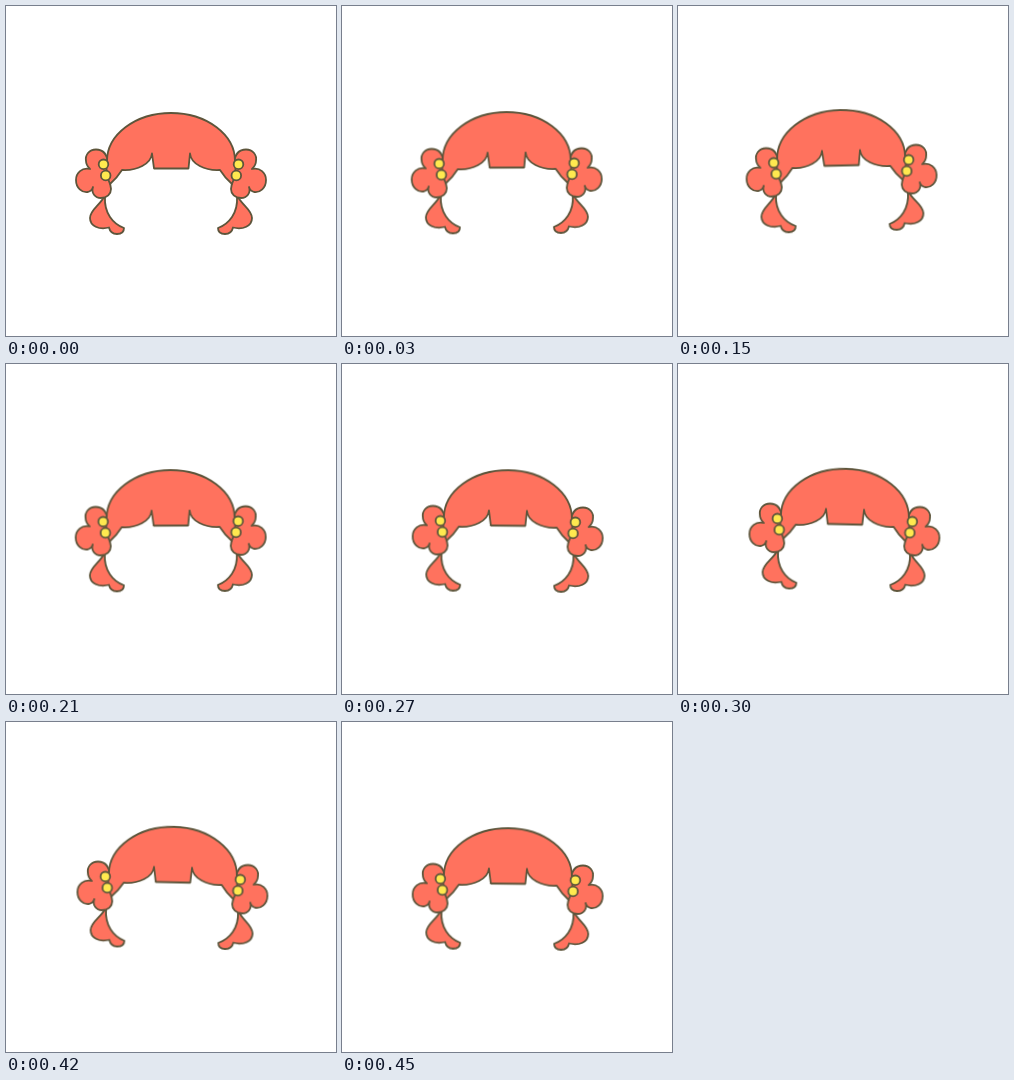
Write an HTML page without scripts that moves like this. It is 330 by 330 pixels and loops after 0.48 s.

```html
<!DOCTYPE html>
<html lang="en">
<head>
<meta charset="utf-8">
<title>Swaying hair</title>
<style>
  html, body { margin: 0; width: 100%; height: 100%; overflow: hidden; background: #fff; }
  svg { display: block; width: 100%; height: 100%; }
  .hair {
    fill: #ff725e;
    stroke: #5d553b;
    stroke-width: 1.8;
    stroke-linejoin: round;
    stroke-linecap: round;
    transform-origin: 165px 238px;
    animation: sway 480ms step-end infinite;
  }
  .bead { fill: #ffe94f; }

  /* A small bob to the left, then a larger one to the right */
  @keyframes sway {
    0%, 50%, 100%   { transform: none; }
    6.25%, 43.75%   { transform: translateY(-.9px) rotate(-.25deg); }
    12.5%, 37.5%    { transform: translateY(-2px) rotate(-.75deg); }
    18.75%, 31.25%  { transform: translateY(-3px) rotate(-1.27deg); }
    25%             { transform: translateY(-3.4px) rotate(-1.5deg); }
    56.25%, 93.75%  { transform: translateY(-.8px) rotate(.6deg); }
    62.5%, 87.5%    { transform: translateY(-2.2px) rotate(1.3deg); }
    68.75%, 81.25%  { transform: translateY(-3.5px) rotate(2deg); }
    75%             { transform: translateY(-4px) rotate(2.33deg); }
  }
</style>
</head>
<body>
<svg viewBox="0 0 330 330">
  <defs>
    <g id="bunch">
      <path d="M98 191C93 200 84 204 84 212C84 220 93 224 103 221.500C104 226 107 228 111 228C115 228 118 226 118 222C107 218 98 207 99 191Z"/>
      <path d="M102 157C101 147 96 143.500 90 143.500C83 143.500 79 149 80 155C80 158 82 161 84 163C76 161 70 167 70 174C70 182 76 187 82 186C84 185.500 86 184 87 181C85 187 89 192 95 192C101 192 105 188 105 183L104 177Z"/>
    </g>
    <g id="beads">
      <circle cx="97.500" cy="158.300" r="4.800"/>
      <circle cx="99.700" cy="169.500" r="4.800"/>
    </g>
  </defs>
  <g class="hair">
    <use href="#bunch"/>
    <use href="#bunch" transform="translate(330) scale(-1 1)"/>
    <path d="M101 155A64 48 0 0 1 229 155Q231 167 226 178Q219 172 214 164C199 165 185 158 184 147.500L182.500 162.500H148L146 147.500C145 158 131 165 116 164Q111 172 104 178Q99 167 101 155Z"/>
    <g class="bead">
      <use href="#beads"/>
      <use href="#beads" transform="translate(330) scale(-1 1)"/>
    </g>
  </g>
</svg>
</body>
</html>
```
